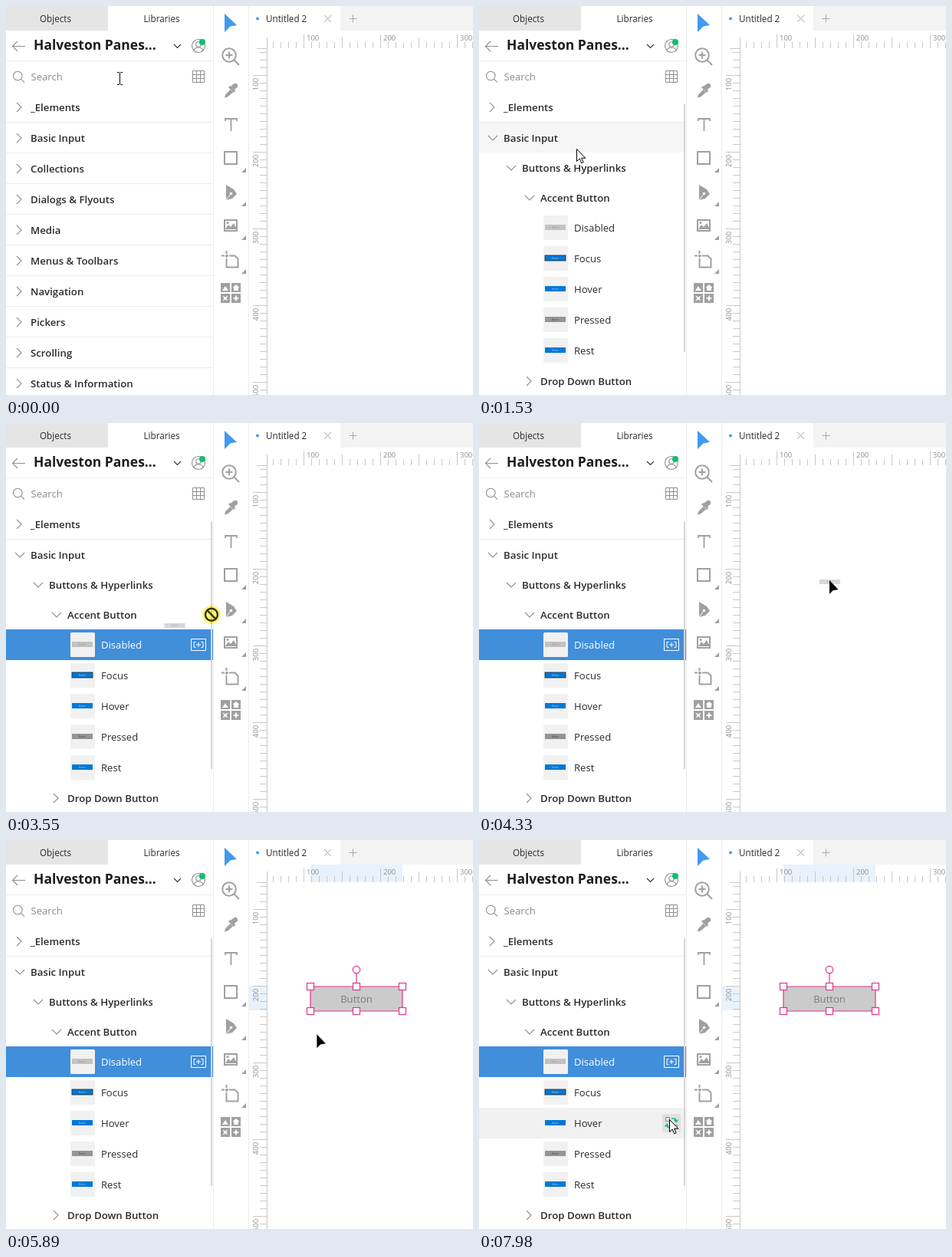
These frames come from a looping animation (609x507 px, 8 s). An HTML page:

```html
<!DOCTYPE html>
<html lang="en">
<head>
<meta charset="utf-8">
<title>Component library</title>
<style>
  html, body { margin: 0; width: 100%; height: 100%; overflow: hidden; background: #fff; }
  svg { display: block; width: 609px; height: 507px; font-family: "Open Sans", sans-serif; font-size: 13.1px; fill: #2b2b2b; }
  .row { font-size: 13.25px; font-weight: 600; }
  .tab { font-size: 11.7px; }
  .title { font-size: 17.5px; font-weight: 700; fill: #1c1c1c; }
  .ruler { font-size: 9.5px; fill: #8c8c8c; }
  .line { fill: none; stroke: #8f8f8f; stroke-width: 1.1; }
  .light { fill: none; stroke: #a8a8a8; }
  .rule { stroke: #ececec; }
  .tick { stroke: #c8c8c8; }
  .tool { fill: #a0a0a0; }
  .toolLine { fill: none; stroke: #a0a0a0; stroke-width: 2; }
  .cut { fill: #fff; }
  .pink { fill: #fff; stroke: #e2348e; stroke-width: 1.2; }
  .tiny { font-size: 3px; text-anchor: middle; }
</style>
</head>
<body>
<svg id="stage" viewBox="0 0 609 507"></svg>
<script>
const LOOP = 8000;
const stage = document.getElementById('stage');

const text = (x, y, label, cls = '', extra = '') => `<text x="${x}" y="${y}" class="${cls}" ${extra}>${label}</text>`;
const rect = (x, y, w, h, fill, extra = '') => `<rect x="${x}" y="${y}" width="${w}" height="${h}" fill="${fill}" ${extra}/>`;
const path = (d, cls = 'line', extra = '') => `<path d="${d}" class="${cls}" ${extra}/>`;
const group = (id, content) => `<g id="${id}">${content}</g>`;
const chevronRight = (x, y) => path(`M${x - 3} ${y - 6}l6 6-6 6`);
const chevronDown = (x, y) => path(`M${x - 6} ${y - 3}l6 6 6-6`);
const separator = y => path(`M0 ${y}.5H270`, 'rule');

function header() {
  return rect(0, 0, 133, 32, '#e5e5e5')
    + text(64.5, 21, 'Objects', 'tab', 'text-anchor="middle"')
    + text(203, 21, 'Libraries', 'tab', 'text-anchor="middle"')
    + path('M25 52.5H8.5M15 46l-6.5 6.5L15 59')
    + text(36, 57, 'Halveston Panes...', 'title')
    + path('M219 50l4.5 4.5 4.5-4.5', 'line', 'style="stroke:#333"')
    + '<circle cx="251" cy="52" r="8.5" class="line"/><circle cx="251" cy="50" r="3.3" class="line"/>'
    + path('M245 58q1-4 6-4t6 4')
    + '<circle cx="256" cy="47" r="4" fill="#12bf6a"/>'
    + separator(71)
    + '<circle cx="15.3" cy="91" r="5.8" class="line"/>' + path('M19.5 95.2l4.5 4.5')
    + text(32.5, 97, 'Search', '', 'fill="#8c8c8c"')
    + path('M243.5 84.5h15v15h-15zM248.5 84.5v15M253.5 84.5v15M243.5 89.5h15M243.5 94.5h15', 'line', 'style="stroke-width:1"')
    + chevronRight(17, 132) + text(32, 137, '_Elements', 'row') + separator(151);
}

function collapsedList() {
  const names = ['Basic Input', 'Collections', 'Dialogs &amp; Flyouts', 'Media', 'Menus &amp; Toolbars',
    'Navigation', 'Pickers', 'Scrolling', 'Status &amp; Information'];
  return names.map((name, i) => {
    const y = 172 + i * 40;
    return chevronRight(17, y) + text(32, y + 5, name, 'row') + separator(y + 19);
  }).join('');
}

function expandedList() {
  const items = [
    ['Disabled', '#c2c2c2', '#999'], ['Focus', '#0078d7', '#9cf', 'stroke="#222" stroke-width=".8"'],
    ['Hover', '#0078d7', '#9cf'], ['Pressed', '#959595', '#444'], ['Rest', '#0078d7', '#9cf']];
  const thumbs = items.map(([name, fill, ink, border = ''], i) => {
    const y = 289 + i * 40;
    return rect(84, y - 16, 32, 32, '#f1f1f1', 'rx="1.5"') + rect(86, y - 4, 27, 7, fill, border)
      + text(99.5, y + 0.5, 'Button', 'tiny', `fill="${ink}"`)
      + text(124, y + 5, name, '', i ? '' : 'id="firstName"');
  }).join('');
  return chevronDown(18, 172) + text(32, 177, 'Basic Input', 'row')
    + chevronDown(42, 211) + text(56, 216, 'Buttons &amp; Hyperlinks', 'row')
    + chevronDown(66, 250) + text(80, 255, 'Accent Button', 'row')
    + thumbs + chevronRight(65, 489) + text(80, 494, 'Drop Down Button', 'row');
}

function toolbar() {
  const corners = [217, 261, 305, 349].map(y => path(`M313 ${y - 6}v6h-6z`, 'tool')).join('');
  const tiles = [[280, 361], [294, 361], [280, 375], [294, 375]].map(([x, y]) => rect(x, y, 12, 12, '#a0a0a0')).join('');
  return path('M285 10L301 25 292.5 26.5 285 34Z', '', 'fill="#3f9af0"')
    + '<circle cx="291" cy="64" r="8.8" class="toolLine"/>' + path('M297.5 70.5l6.5 6.5M286.5 64h9M291 59.5v9', 'toolLine')
    + path('M293 105l2-2 3-2q3-1 4 2t-2 4l-2 2 1 2-2 2-7-7 2-2z', 'tool')
    + path('M292.5 109l3.5 3.5-7 6-4 1 1-4z', 'tool')
    + path('M286 150v-3h15v3M293.5 147v16', 'toolLine', 'style="stroke-width:1.8"')
    + path('M285 190h16v16h-16z', 'toolLine')
    + path('M287 233l10 6 4 6-6 6-8 2z', 'tool') + path('M287 253l6-8', 'toolLine', 'style="stroke:#fff;stroke-width:1"')
    + '<circle cx="293.5" cy="244.5" r="1.8" class="cut"/>'
    + path('M285 279h16v14h-16z', 'toolLine') + path('M286 291l4-6 3 3 4-5 4 8z', 'tool') + '<circle cx="289" cy="282.5" r="1.6" class="tool"/>'
    + path('M287.5 329v11.5h15v-11l-4-4H291', 'toolLine')
    + path('M287.5 319v10M281 325.5h10', 'toolLine', 'style="stroke-dasharray:4 1"')
    + corners + tiles
    + path('M282 371l4-6 4 6zM300 363l4.5 4H303v4h-6v-4h-1.5z', 'cut')
    + path('M282.5 377.5l3.5 2 3.5-2-2 3.5 2 3.5-3.5-2-3.5 2 2-3.5z', 'cut')
    + path('M300 376.5l1.3 3.2 3.2 1.3-3.2 1.3-1.3 3.2-1.3-3.2-3.2-1.3 3.2-1.3z', 'cut')
    + path('M270.5 0V507M316.5 0V507', 'rule');
}

function rulers() {
  let out = group('rulerMarks', rect(397, 32, 120, 23, '#e8f2fd') + rect(317, 190, 23, 32, '#e8f2fd'));
  const length = n => n % 100 === 0 ? 18 : n % 50 === 0 ? 14 : 8;
  let ticks = 'M340.5 41V507M327 55.5H340';
  for (let n = 60; n <= 320; n += 10) ticks += `M${288 + n}.5 55v-${length(n)}`;
  for (let n = 70; n <= 510; n += 10) ticks += `M340 ${n - 10}.5h-${n % 100 ? 9 : 18}`;
  out += path(ticks, 'tick');
  for (let n = 100; n <= 300; n += 100) out += text(292 + n, 45, n, 'ruler');
  for (let n = 100; n <= 500; n += 100)
    out += text(0, 0, n, 'ruler', `text-anchor="middle" transform="translate(329 ${n + 2}) rotate(-90)"`);
  return out;
}

function documentTabs() {
  return rect(436, 0, 173, 32, '#f3f3f3') + '<circle cx="328" cy="16.5" r="2" fill="#3f9af0"/>'
    + text(339, 21, 'Untitled 2', 'tab') + path('M415 12l9 9M424 12l-9 9M447.5 16.5h10M452.5 11.5v10', 'light');
}

function placedButton() {
  const handles = [397, 457, 517].flatMap(x => [191, 223].map(y => `<rect x="${x - 4.5}" y="${y - 4.5}" width="9" height="9" class="pink"/>`));
  return rect(397, 191, 120, 32, '#cbcbcb') + text(457, 212, 'Button', '', 'text-anchor="middle" fill="#7b7b7b"')
    + path('M397 191h120v32h-120zM457 191v-18', 'pink', 'style="fill:none"')
    + handles.join('') + '<circle cx="457" cy="169" r="4.7" class="pink"/>';
}

const cursors = {
  ibeam: path('M-3 -7.5h2.5l1 1 1-1h2.5M.5 -6.5v14M-3 8.5h2.5l1-1 1 1h2.5', '', 'fill="none" stroke="#000"'),
  arrow: path('M.5 .5V16.5l3.7-3.5 2.5 5.8 2.4-1-2.5-5.6h5.2z', '', 'fill="#fff" stroke="#000"'),
  solid: path('M0 -1V17l4.5-4.8L11.5 11z', '', 'fill="#000"'),
  blocked: '<g fill="none" stroke="#33330d" stroke-width="2.4"><circle r="8"/><path d="M-5.5 -5.5l11 11"/></g>',
  resize: path('M-12 0l5-5v3.5H7V-5l5 5-5 5V1.5H-7V5z', '', 'fill="#000" stroke="#fff" stroke-width=".6"')
};

stage.innerHTML = rect(0, 0, 609, 507, '#fff')
  + '<rect id="hover" width="270"/>'
  + rect(0, 269, 270, 40, '#418edb', 'id="selected"')
  + header() + group('collapsed', collapsedList()) + group('expanded', expandedList())
  + group('insertIcon', path('M241.5 281.5h19v15h-19zM247.5 285.5H245v7h2.5M254.5 285.5h2.5v7h-2.5M251 286v6M248 289h6', '', 'fill="none"'))
  + group('swapIcon', rect(-12, -12, 24, 24, '#e1e1e1', 'id="swapBack" rx="2"')
    + path('M-7.5 -7.5h5v5h-5zM2.5 2.5h5v5h-5z')
    + path('M0 -6h3q3 0 3 4M3.5 -4.5l2.5 3 2.5-3M0 6h-3q-3 0-3-4M-8.5 4.5l2.5-3 2.5 3', 'line', 'style="stroke:#22bd70;stroke-width:1.5"'))
  + group('scrollbar', rect(267, 128, 2, 323, '#d6d6d6'))
  + toolbar() + documentTabs() + rulers() + group('placed', placedButton())
  + group('ghost', rect(-13.5, -3, 27, 6, '#d8d8d8') + text(0, 1, 'Button', 'tiny', 'fill="#aaa"'))
  + '<circle id="press" r="12" fill="#fdf674" style="mix-blend-mode:multiply"/>'
  + group('pointer', Object.entries(cursors).map(([name, shape]) => group(name, shape)).join(''));

const byId = id => document.getElementById(id);
const show = (id, visible) => byId(id).style.display = visible ? '' : 'none';
const place = (id, [x, y]) => byId(id).setAttribute('transform', `translate(${x} ${y})`);

const linear = p => p;
const smooth = p => p * p * (3 - 2 * p);
const easeIn = p => p ** 3;
const easeOut = p => 1 - (1 - p) ** 2;

// Pointer moves: start, end, steps, easing, then start, control and end point of a curve.
const moves = [
  [210, 520, 5, smooth, [148, 94], [146, 120], [133, 142]],
  [690, 920, 4, smooth, [133, 142], [131, 165], [127, 186]],
  [2380, 2930, 8, easeOut, [127, 186], [101, 226], [121, 292]],
  [3400, 3860, 7, linear, [121, 292], [295, 238], [457, 206]],
  [4410, 4570, 3, smooth, [457, 206], [430, 235], [409, 254]],
  [5890, 6030, 3, easeIn, [409, 254], [360, 258], [314.5, 262]],
  [6310, 7050, 10, smooth, [314.5, 262], [225, 305], [153, 360]],
  [7360, 7980, 9, smooth, [153, 360], [200, 364], [248, 364]]
];

function pointerAt(t, lag = 0) {
  const [start, end, steps, ease, a, b, c] = moves.findLast(m => t >= m[0]) || moves[0];
  const step = Math.floor((t - start) / (end - start) * (steps - 1) + 0.1) + 1 - lag;
  const u = ease(Math.min(Math.max(step / steps, 0), 1));
  return a.map((v, i) => (1 - u) ** 2 * v + 2 * u * (1 - u) * b[i] + u * u * c[i]);
}

const closedTops = Array.from({ length: 11 }, (_, i) => 112 + i * 40);
const openTops = [112, 152, 191, 231, 269, 309, 349, 389, 429, 469, 507];

function draw(now) {
  const t = now % LOOP;
  const [x, y] = pointerAt(t);
  const [hoverX, hoverY] = pointerAt(t, 1);
  const open = t >= 1450;
  const selected = t >= 3400;
  const dragging = selected && t < 4410;
  const placed = t >= 4410;

  const tops = open ? openTops : closedTops;
  const row = dragging || hoverX >= 270 || hoverY < 112 ? -1 : tops.findLastIndex(top => top <= hoverY);
  show('hover', row >= 0);
  if (row >= 0) {
    byId('hover').setAttribute('y', tops[row]);
    byId('hover').setAttribute('height', tops[row + 1] - tops[row]);
    byId('hover').setAttribute('fill', open && row > 3 ? '#f1f1f1' : '#f6f6f6');
  }

  show('collapsed', !open);
  show('expanded', open);
  show('scrollbar', open);
  show('selected', selected);
  byId('firstName').style.fill = selected ? '#fff' : '';
  show('insertIcon', selected || open && row === 4);
  byId('insertIcon').setAttribute('stroke', selected ? '#fff' : '#888');
  show('swapIcon', placed && row > 4 && row < 9);
  if (row > 4) place('swapIcon', [251, tops[row] + 20]);
  show('swapBack', x > 239);

  show('placed', placed);
  show('rulerMarks', placed);
  show('ghost', dragging);
  place('ghost', pointerAt(t, 1).map((v, i) => v + [0.5, 1][i]));
  show('press', t >= 1370 && t < 1530 || t >= 3250 && t < 4250);
  place('press', [x, y]);

  const kind = y < 112 ? 'ibeam'
    : t >= 6030 && t < 6310 ? 'resize'
    : x >= 317 ? 'solid'
    : dragging ? 'blocked' : 'arrow';
  for (const name in cursors) show(name, name === kind);
  place('pointer', [x, y]);
  requestAnimationFrame(draw);
}
requestAnimationFrame(draw);
</script>
</body>
</html>
```
